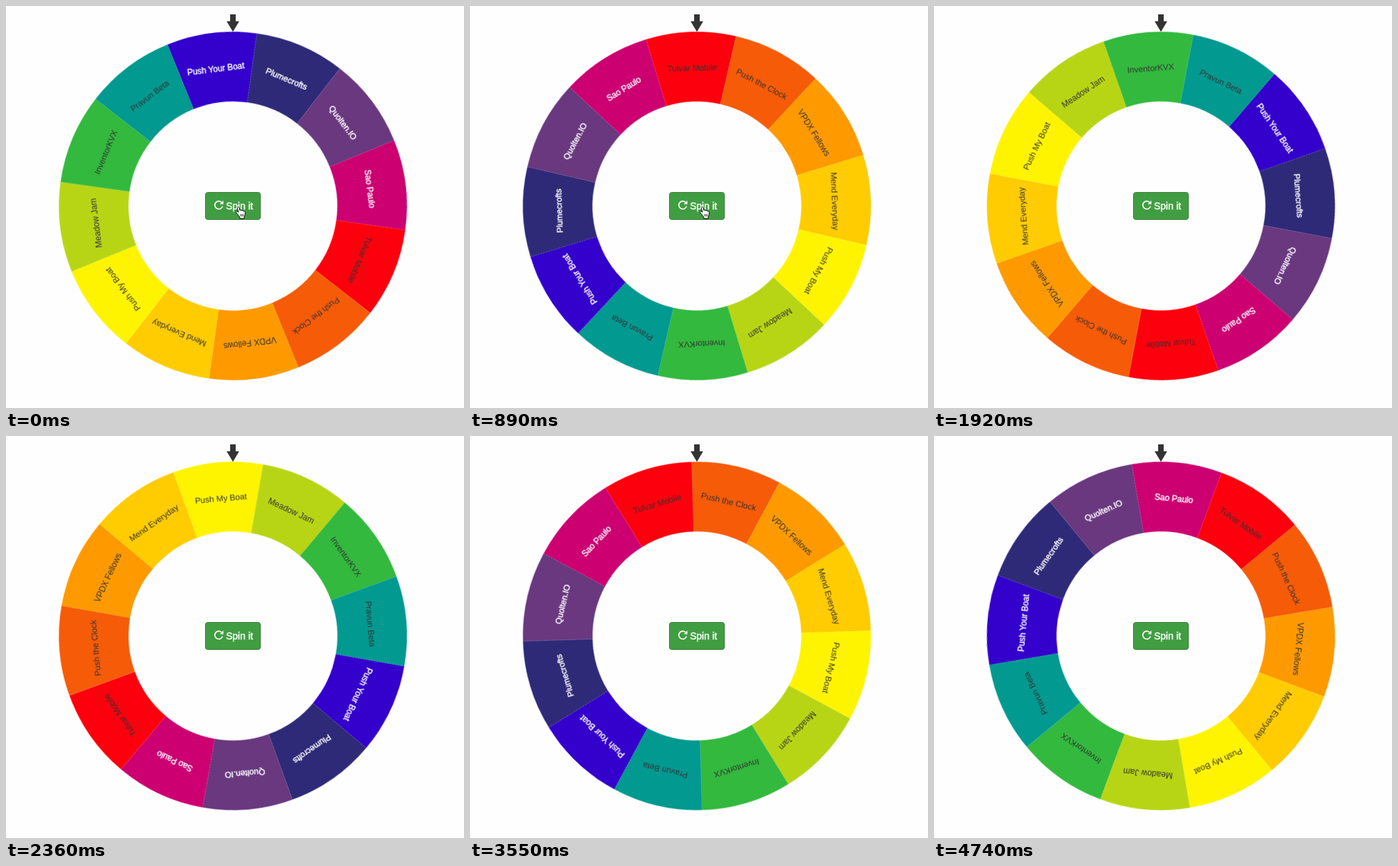
An HTML page for the animation above (5120 ms loop, 658 px wide and 577 px high).

```html
<!DOCTYPE html>
<html lang="en">
<head>
<meta charset="utf-8">
<title>Spin it</title>
<style>
  html, body { margin: 0; width: 100%; height: 100%; overflow: hidden; background: #fefefe; }
  svg { display: block; position: absolute; left: 0; top: 0; }
  text { font-family: "Liberation Sans", Arial, Helvetica, sans-serif; }
  #wheel text { font-size: 12px; text-anchor: middle; fill: #333; }
  #wheel text.light, .label { fill: #fff; stroke: #fff; stroke-width: .45px; }
  .label { font-size: 14px; }
</style>
</head>
<body>
<svg width="658" height="577" viewBox="0 0 658 577">
  <g transform="translate(326 287)"><g id="wheel"></g></g>
  <path fill="#333" d="M322 12h8v10h5l-9 15l-9-15h5z"/>

  <rect x="286.5" y="267.5" width="79" height="39" rx="3.5" fill="#419d41" stroke="#398439"/>
  <path d="M309.6 281.6A5.7 5.7 0 1 0 311.1 287.6" fill="none" stroke="#fff" stroke-width="1.7"/>
  <path d="M312.3 279.2v5.4h-5.4z" fill="#fff"/>
  <text class="label" x="316" y="292">Spin it</text>

  <g id="hand" stroke="#000" stroke-width="1" stroke-linejoin="round">
    <path fill="#fff" d="M334 300.5L330.8 296.8C329.6 295.2 331.4 293.8 332.8 295L334 296.2L332.4 290.6C332 288.6 334.4 288 335 289.8L336.2 293.6C336.6 292.6 338.6 292.6 339 294C339.6 293.2 341.2 293.4 341.5 294.8C342.6 294.2 343.6 295 343.6 296.4C343.8 299 343.4 300.6 342.4 302.2L342.2 305H336L335.8 303.2Z"/>
    <path fill="none" stroke-width=".8" d="M337 298.5v3.6M339 298.5v3.6M341 298.5v3.6"/>
  </g>
  <path id="arrow" fill="#000" stroke="#fff" stroke-width=".6" d="M646.5 572.5v13l3-3l2 5l2-1l-2-5h4z"/>
</svg>

<script>
  const LOOP = 5120;
  const OUTER = 250, INNER = 150, TEXT = 194, ARC = 30;

  // label, colour, light text
  const slices = [
    ["Push Your Boat", "#3300cc", true],
    ["Plumecrofts", "#2e2a77", true],
    ["Quolten.IO", "#69387f", true],
    ["Sao Paulo", "#cc0071", true],
    ["Tulvar Mobile", "#fc000d"],
    ["Push the Clock", "#f65b08"],
    ["VPDX Fellows", "#fe9a00"],
    ["Mend Everyday", "#ffcc02"],
    ["Push My Boat", "#fff400"],
    ["Meadow Jam", "#b8d515"],
    ["InventorKVX", "#33b93e"],
    ["Pravun Beta", "#029990"]
  ];

  const $ = id => document.getElementById(id);

  function add(parent, tag, attrs, content = "") {
    const el = document.createElementNS("http://www.w3.org/2000/svg", tag);
    for (const key in attrs) el.setAttribute(key, attrs[key]);
    el.textContent = content;
    parent.appendChild(el);
  }

  // Point at a clockwise angle from the top
  function polar(radius, deg) {
    const a = deg * Math.PI / 180;
    return `${(radius * Math.sin(a)).toFixed(3)} ${(-radius * Math.cos(a)).toFixed(3)}`;
  }

  const half = ARC / 2;
  slices.forEach(([, fill], i) => {
    const from = i * ARC - half, to = i * ARC + half;
    add($("wheel"), "path", {
      fill,
      d: `M${polar(OUTER, from)}A${OUTER} ${OUTER} 0 0 1 ${polar(OUTER, to)}` +
         `L${polar(INNER, to)}A${INNER} ${INNER} 0 0 0 ${polar(INNER, from)}Z`
    });
  });
  slices.forEach(([name, , light], i) => {
    add($("wheel"), "text", {
      class: light ? "light" : "dark",
      transform: `rotate(${i * ARC}) translate(0 ${-TEXT})`
    }, name);
  });

  // The wheel ticks about every 150 ms; a few ticks are 10 ms shorter
  const TICKS = 32, shortTicks = [3, 7, 10, 14, 18, 28];
  const times = [0];
  for (let i = 0; i < TICKS; i++) times.push(times[i] + (shortTicks.includes(i) ? 140 : 150));

  // Cubic slow-down: the angle left to turn falls as speed^4
  const START = -7.1, TOTAL = 668;
  const poses = [[0, START], [6, 238], [10, 343.3], [16, 475], [19, 524.5], [24, 583.3], [32, 635.4]];
  const speed = angle => Math.pow(1 - (angle - START) / TOTAL, 1 / 4);

  function angleAt(tick) {
    const n = poses.findIndex(pose => pose[0] >= tick);
    if (n === 0) return START;
    const [t0, a0] = poses[n - 1], [t1, a1] = poses[n];
    const s0 = speed(a0), s1 = speed(a1);
    const s = s0 + (s1 - s0) * (tick - t0) / (t1 - t0);
    return START + TOTAL * (1 - s ** 4);
  }

  // steps: [time, value] pairs, each held until the next
  function hold(el, prop, steps) {
    const frames = steps.map(([time, value]) =>
      ({ offset: time / LOOP, [prop]: value, easing: "steps(1, end)" }));
    frames.push({ offset: 1, [prop]: steps[steps.length - 1][1] });
    el.animate(frames, { duration: LOOP, iterations: Infinity });
  }

  hold($("wheel"), "transform", times.map((time, i) => [time, `rotate(${angleAt(i).toFixed(2)}deg)`]));
  hold($("hand"), "opacity", [[0, 1], [times[10], 0]]);
  hold($("arrow"), "opacity", [[0, 0], [times[10], 1], [times[11], 0]]);
</script>
</body>
</html>
```
